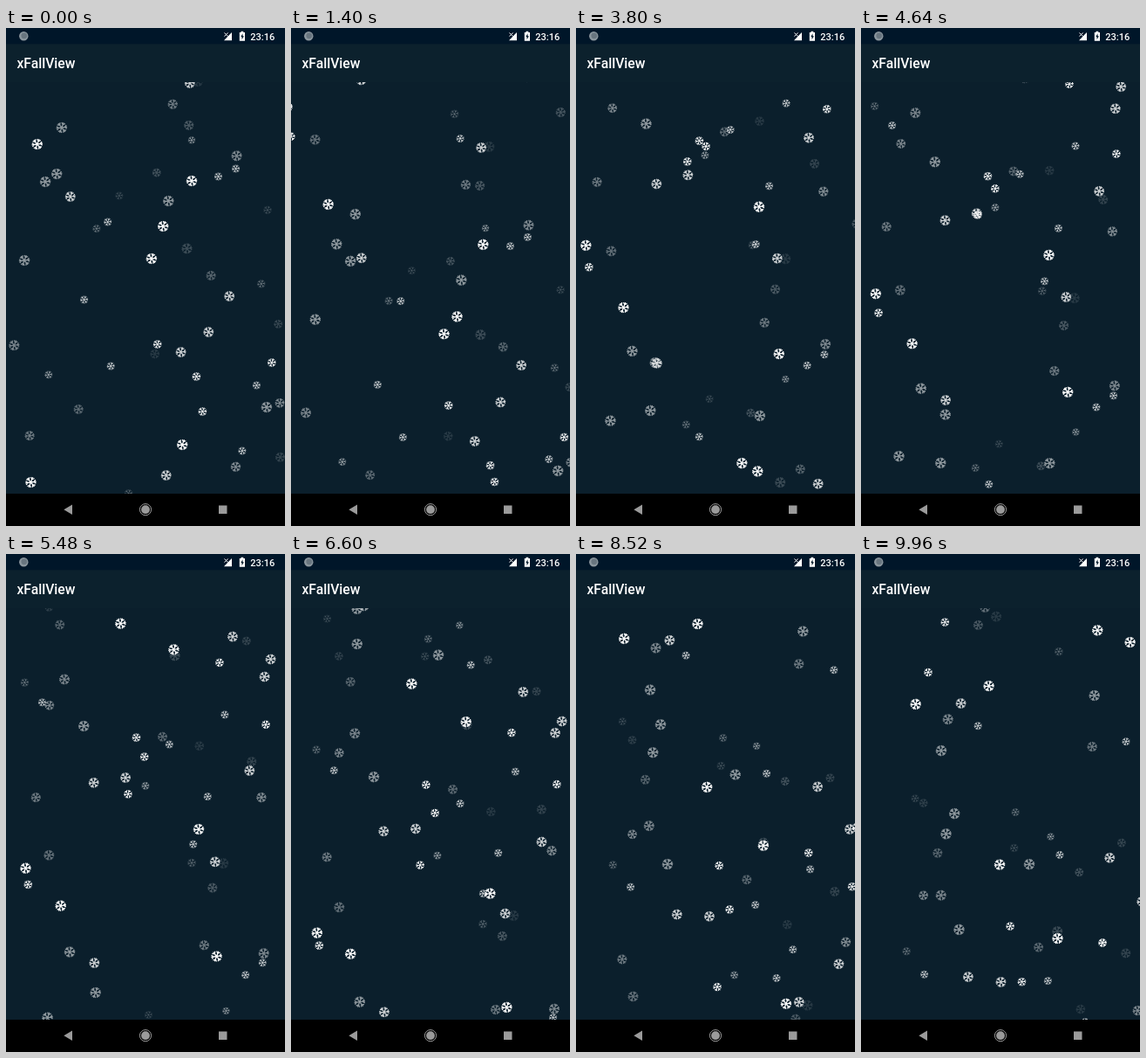
Animation, 320 px wide and 570 px high, one loop 10000 ms. Source, as an HTML page with a canvas:

```html
<!DOCTYPE html>
<html lang="en">
<head>
<meta charset="utf-8">
<title>xFallView</title>
<style>
  html, body { margin: 0; width: 100%; height: 100%; overflow: hidden; background: #0b1f2c; }
  canvas, svg { position: absolute; left: 0; top: 0; width: 320px; height: 570px; }
  text { font-family: Roboto, sans-serif; font-weight: 500; fill: #fff; }
</style>
</head>
<body>
<canvas width="320" height="570"></canvas>
<svg viewBox="0 0 320 570">
  <rect width="320" height="18.5" fill="#001629"/>
  <rect y="18.5" width="320" height="43.5" fill="#0c212d"/>
  <circle cx="20.3" cy="9.3" r="5.2" fill="#8b969e"/>
  <circle cx="20.8" cy="8.8" r="3.4" fill="#68757f"/>
  <path d="M250 14.2L259 5v9.2z" fill="#fff"/>
  <path d="M250.5 5.5l4 4m0-4l-4 4" stroke="#fff"/>
  <path d="M267.8 5h1.7V3.8h2.8V5h1.7v9.8h-6.2z" fill="#fff"/>
  <path d="M271.5 6.3l-2.3 4h1.4v3l2.3-4h-1.4z" fill="#001629"/>
  <text x="308.3" y="13.7" font-size="11.1" text-anchor="end">23:16</text>
  <text x="12.4" y="46.4" font-size="15.7">xFallView</text>
  <rect y="533" width="320" height="37"/>
  <path d="M66.3 551.2l9.7-5.8v11.6z" fill="#9b9b9b"/>
  <circle cx="160" cy="551.2" r="4.9" fill="#9b9b9b"/>
  <circle cx="160" cy="551.2" r="6.6" fill="none" stroke="#9b9b9b"/>
  <rect x="244" y="546.5" width="9.5" height="9.5" fill="#9b9b9b"/>
</svg>
<script>
const LOOP = 10000, STEP = 40;
const TOP = 55, FALL = 522, DRIFT = 0.1;   // entry height, distance per pass, sideways slope

// Each flake: start height, speed in px/s, then its entry x on every pass.
const groups = [
  { alpha: 1, size: 13.5, flakes: [
    [133, 49.2, 28, 304], [175, 52.1, 201, 51], [227, 73.8, 163, 187], [264, 61.6, 146, 129],
    [477, 65.7, 160, 195, 268], [520, 66, -18, -8], [182, 49.3, , 137]] },
  { alpha: 0.95, size: 10.5, flakes: [
    [362, 50, 143], [383, 61, 272, 284], [399, 72.6, 184, 118, 94], [559, 62.3, , -7, 69],
    [254, 71.6, , 238], [468, 48.2, , 134], [439, 57.5, 187, 141]] },
  { alpha: 0.8, size: 12.8, flakes: [
    [512, 49.6, 138, 80], [492, 52.2, , 117], [348, 57.4, 203, 288], [371, 72.8, 169, 260],
    [307, 56.5, 231, 256], [63, 52.8, 210], [295, 63.4, , 297], [193, 50.2, 60, 103]] },
  { alpha: 0.68, size: 9.8, flakes: [
    [311, 69.5, 64, 30], [170, 56.9, 232, 288], [484, 57.6, 228, 209], [56, 50.4, 187],
    [409, 60.4, 252, 171], [222, 64.7, 100, 199], [387, 58.2, 87, 238], [161, 56, 253, 120]] },
  { alpha: 0.55, size: 13.5, flakes: [
    [114, 70.8, 58, 83], [198, 64.7, 172, 71], [266, 48.3, 0, 75],
    [176, 51, 33, 257], [167, 71.3, 47, 163], [434, 52, 261, 75]] }
];

const flakes = groups.flatMap(({ alpha, size, flakes }) =>
  flakes.map(([y, speed, ...xs]) => ({ alpha, size, y, speed, xs })));

// Faint flakes in the distance
let seed = 7;
const random = (low, high) => {
  seed = (seed * 16807) % 2147483647;
  return low + (high - low) * seed / 2147483647;
};
for (let i = 0; i < 25; i++) {
  flakes.push({
    alpha: random(0.12, 0.5), size: random(8.5, 13.5),
    y: TOP + FALL * (i + random(0, 1)) / 25, speed: random(48, 74),
    xs: [0, 1, 2].map(() => random(-25, 310))
  });
}

// Unit snowflake: six arms, each with a pair of twigs
const crystal = new Path2D();
for (let i = 0; i < 6; i++) {
  const angle = i * Math.PI / 3 - 0.15;
  const point = (radius, turn) => [radius * Math.cos(angle + turn), radius * Math.sin(angle + turn)];
  crystal.moveTo(0, 0);
  crystal.lineTo(...point(0.93, 0));
  crystal.moveTo(...point(0.9, 0.36));
  crystal.lineTo(...point(0.52, 0));
  crystal.lineTo(...point(0.9, -0.36));
}

const ctx = document.querySelector("canvas").getContext("2d");
ctx.strokeStyle = "#fff";

function draw(seconds) {
  ctx.clearRect(0, 0, 320, 570);
  for (const { alpha, size, y, speed, xs } of flakes) {
    const travelled = y - TOP + speed * seconds;
    const x = xs[Math.floor(travelled / FALL)];
    if (x === undefined) continue;
    const fallen = travelled % FALL;
    ctx.save();
    ctx.globalAlpha = alpha;
    ctx.translate(x + fallen * DRIFT, TOP + fallen);
    ctx.scale(size / 2, size / 2);
    ctx.lineWidth = 0.19;
    ctx.stroke(crystal);
    ctx.restore();
  }
}

const start = performance.now();
function tick() {
  const time = (performance.now() - start) % LOOP;
  draw(Math.floor(time / STEP) * STEP / 1000);
  requestAnimationFrame(tick);
}
tick();
</script>
</body>
</html>
```
